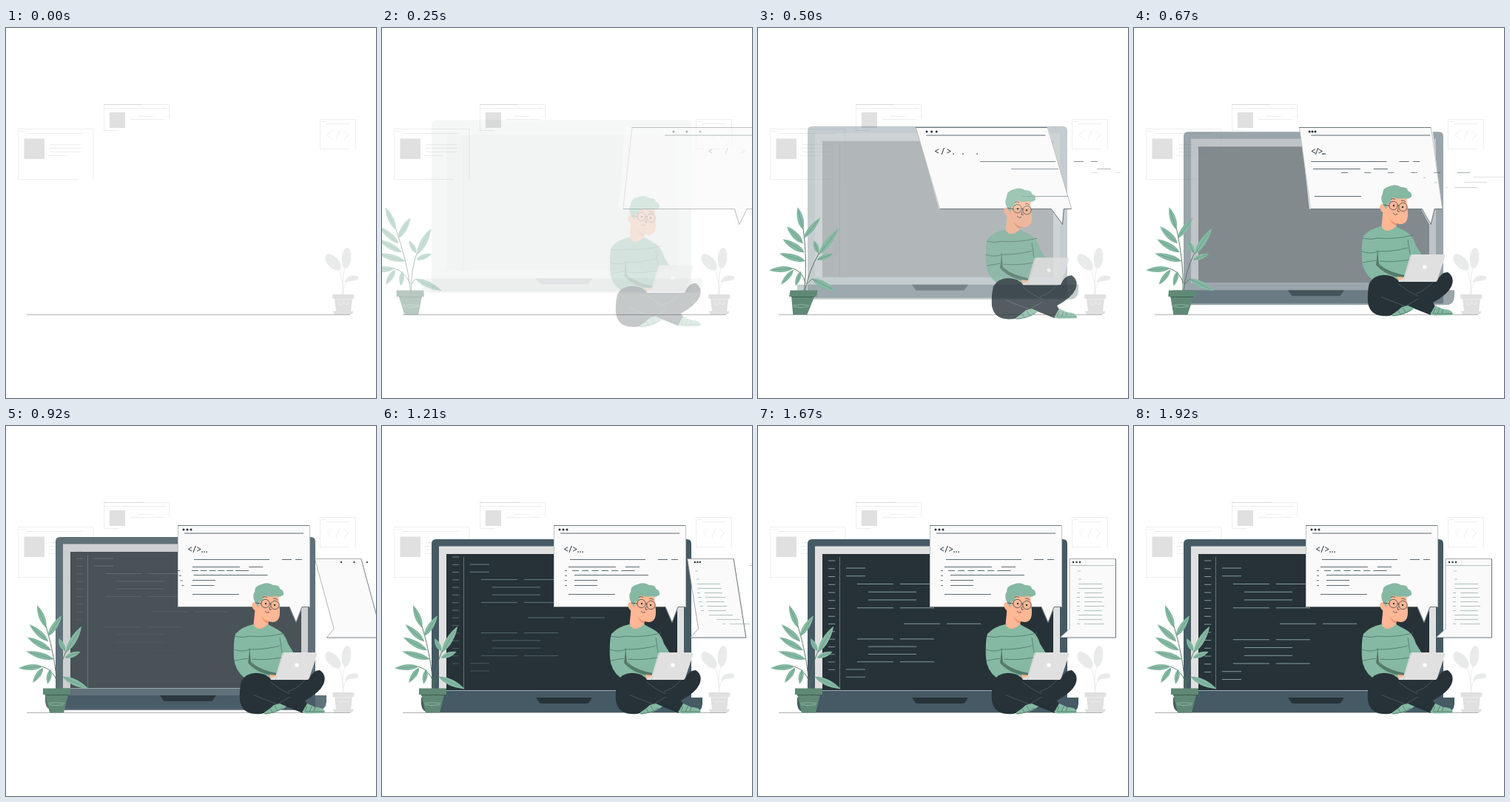
Recreate the animation shown at these times as an HTML page. Size 500x500 px, loop 2000 ms.

```html
<!DOCTYPE html>
<html lang="en">
<head>
<meta charset="utf-8">
<title>Programming</title>
<style>
html, body { margin: 0; width: 100%; height: 100%; overflow: hidden; background: #fff; }
svg { display: block; width: 100vw; height: 100vh; }
text { font: 500 12px "Noto Sans Mono", "DejaVu Sans Mono", monospace; text-anchor: middle; fill: #263238; }
.line { fill: none; stroke: #e9e9e9; stroke-width: .8; }
.ink { fill: none; stroke: #37474f; stroke-width: .8; }
.gray { fill: #e0e0e0; }
.green { fill: #85b9a3; }
.dark { fill: #263238; }
.slate { fill: #455a64; }
.skin { fill: #ffb794; }
.fold { fill: none; stroke: #4d7565; stroke-width: .8; }
</style>
</head>
<body>
<svg viewBox="0 0 500 500">
  <g id="backdrop">
    <path class="line" d="M16.500 205V136.500H118V205M16 204.500H97M27 142.500H104M18 139.500H26"/>
    <path class="line" d="M60 157.500H101M58 162.500H101M60 167.500H101M57 172.500H83"/>
    <path class="gray" d="M24.500 149.500h27.500v27.500h-27.500zM140 114h21v21h-21z"/>
    <path class="line" d="M132.500 139V103.500H220.500V123M132 108.500H217M132 138.500H152M179 119.500H199M168 123.500H214"/>
    <path d="M132 103.500H185" stroke="#d5d5d5" stroke-width=".8"/>
    <path class="line" d="M424.500 164V123.500H473M472.500 124V164M424 163.500H464M433 129.500H464M427 126.500H432"/>
    <path class="line" d="M440 139L434 144.500L440 150M451 138L446 151M457 139L463 144.500L457 150"/>
    <g fill="#e8ebea">
      <ellipse cx="442" cy="316.500" rx="7.500" ry="13.500" transform="rotate(-43 442 316.500)"/>
      <ellipse cx="460" cy="311" rx="6.200" ry="14" transform="rotate(6 460 311)"/>
      <path d="M458 345C459 336 465 333 475 335C479 341 470 342 465 342C463 342 461 343 458 345Z"/>
    </g>
    <path class="line" d="M450 326Q456 340 455.500 360M458 323Q454 340 455.500 360M460 344Q456 348 455.500 360"/>
    <path class="gray" d="M441.500 360H470V366H441.500ZM444 366H468L466 383H446ZM442 382.500H469.500Q469 387.500 465 387.500H446Q442 387 442 382.500Z"/>
    <path d="M444 367H468M448 371l4 3 4-3 4 3 4-3" fill="none" stroke="#efefef"/>
  </g>
  <path d="M28 387.500H465" stroke="#aaa" stroke-width=".9"/>

  <g id="laptop">
    <path class="slate" d="M67 385V159Q67 153 73 153H412Q418 153 418 159V385Z"/>
    <path class="slate" d="M53 367H433V376Q432 387 422 387H64Q54 387 53 376Z"/>
    <path class="gray" d="M77 357V162.500H408V357Z"/>
    <path id="screen" class="dark" d="M87 357V173H399V357Z"/>
    <path d="M77 357.500H408" stroke="#b9c4c8" stroke-width=".8"/>
    <path class="dark" d="M208 367H284L280 373Q279 375 276 375H216Q213 375 212 373Z"/>
    <path d="M110.500 177V356" stroke="#819095" stroke-width=".7"/>
  </g>
  <g id="code" stroke="#91a9a4" stroke-width=".9"></g>

  <g id="panel">
    <path d="M421 179.500H483.500V286H408L421 274Z" fill="#fafafa"/>
    <path d="M408 286L421 274V179.500H483.500" fill="none" stroke="#888" stroke-width=".7"/>
    <path d="M483.500 179.500V286H408" fill="none" stroke="#45525a" stroke-width=".8"/>
  </g>
  <g id="panelText"></g>

  <path id="bubbleFill" d="M232 134H410.500V244.500H400L392 265.500L383 244.500H232Z" fill="#fafafa"/>
  <g id="bubble" fill="none" stroke-width=".8">
    <path d="M232.500 134.500H410.500V244.500H400L392 265.500L383 244.500H232.500Z" fill="#fafafa" stroke="#b2b6b8"/>
    <path d="M232 134.500H410M232.500 244.500H383L392 265.500L400 244.500H410" stroke="#5d686d"/>
  </g>
  <g id="bubbleText"></g>

  <g id="plant">
    <path d="M69 355Q68 318 54 270M70 355Q71 328 81 304M69 345Q63 329 49 325M71 346L77 339" fill="none" stroke="#54705f" stroke-width=".9"/>
    <g id="leaves"></g>
    <path d="M50 354.500H87V363H50ZM53 363H84L78 387.500H59Z" fill="#5f8975"/>
    <path d="M53 363.500H84" stroke="#3f6150" stroke-width="1.200"/>
    <path d="M57 375Q68 372 79 375M58 376.500Q68 379 78 376.500" fill="none" stroke="#9ac4b0" stroke-width=".7"/>
  </g>

  <g id="person">
    <path class="skin" d="M337 242L334 274Q345 284 355 274L354 260Z"/>
    <path class="skin" d="M339 224Q353 217 368 228L370 249Q371 265 360 265Q348 264 341 252Q333 249 332 242Q333 236 339 239Z"/>
    <path d="M345 257Q349 263 355 264L354 267Q347 264 345 257Z" fill="#e99573"/>
    <path class="green" d="M337 239Q332 231 336 224Q336 216 345 214Q354 210 361 215Q370 215 370 220Q376 222 375 228Q371 232 365 230Q356 232 350 229Q347 230 347 236L342 238L341 245Z"/>
    <g class="ink">
      <circle cx="350.500" cy="240" r="5.700"/><circle cx="363.500" cy="242" r="5.700"/>
      <path d="M337 239L345 240M356 240Q357.500 239 358 241M347 231.500Q350 229.500 353 231.500M361 233.500Q364 232 367 235M357 244L356 248L359 248M350 250Q352 253.500 356 251.500"/>
    </g>
    <circle class="dark" cx="351" cy="240" r="1.200"/><circle class="dark" cx="363" cy="242" r="1.200"/>
    <path class="green" d="M310 281Q319 271 334 268Q341 280 354 268L367 275Q377 280 381 294L389 307L384 322L366 342L322 340Q309 330 308 313Q307 291 310 281Z"/>
    <path d="M329 303L331 320Q345 330 366 334L364 338Q340 335 327 320Z" fill="#577c6c"/>
    <path class="fold" d="M308 302Q319 306 330 302Q352 302 370 297M309 284Q320 287 329 284Q352 286 377 280M309 317L327 314M332 315Q350 317 372 313M329 300L330 318Q346 334 366 335M370 286L373 306"/>
    <path class="dark" d="M318 345Q328 329 350 336L360 343H409Q414 330 424 330Q434 337 429 349Q424 360 404 371L407 376L401 388L371 376L357 385Q348 390 336 389Q319 388 316 371Q315 357 318 345Z"/>
    <path d="M334 363Q352 371 367 376L384 366M381 359Q394 355 404 343M358 346Q370 357 384 362" fill="none" stroke="#57636a" stroke-width=".7"/>
    <path class="green" d="M370 375L379 379Q370 386 359 388Q348 391 349 387Q357 382 362 377ZM407 375L418 380Q431 380 431 388L406 388.500L400 387Z"/>
    <path class="fold" d="M357 382l4 6M363 378l4 6M349 389Q363 388 374 381M407 379l-3 7M413 379l-3 7M405 386H430M418 380l-2 5"/>
    <path class="skin" d="M356 336L367 337L364 342L357 341Z"/>
    <path d="M376 306H418Q421 306 420 310L410 340Q409 343 405 343H358L357 341L364 339L373 309Q374 306 376 306Z" fill="#e0e0e0"/>
    <path d="M364 343L375 307" stroke="#c8c8c8" stroke-width=".7"/>
    <circle cx="393" cy="323" r="2.700" fill="#fff"/>
  </g>
</svg>

<script>
const $ = id => document.getElementById(id);
const LOOP = 2000;

const ramp = (t, from, to) => Math.min(1, Math.max(0, (t - from) / (to - from)));
const smooth = (t, from, to) => {
  const p = ramp(t, from, to);
  return p * p * (3 - 2 * p);
};

// Linear track through [time, value] points
function track(t, points) {
  const i = points.findIndex(([time]) => t <= time);
  if (i === 0) return points[0][1];
  if (i < 0) return points[points.length - 1][1];
  const [t0, a] = points[i - 1], [t1, b] = points[i];
  return a + (b - a) * ramp(t, t0, t1);
}

function add(parent, tag, attrs, text = '') {
  const el = document.createElementNS('http://www.w3.org/2000/svg', tag);
  for (const name in attrs) el.setAttribute(name, attrs[name]);
  el.textContent = text;
  return $(parent).appendChild(el);
}

function place(el, dx, dy, opacity) {
  el.setAttribute('transform', `translate(${dx} ${dy})`);
  el.setAttribute('opacity', opacity);
}

// Rush in sideways, leaning forward, then back, then upright
const LEAN = [[130, -30], [370, 17], [430, 20], [670, 8], [790, -4], [900, 0]];
function lightSpeed(id, t, distance, cy, tilt = 1) {
  const x = distance * (1 - ramp(t, 130, 400)) ;
  const angle = tilt * track(t, LEAN);
  $(id).setAttribute('transform', `translate(${x} ${cy}) skewX(${angle}) translate(0 ${-cy})`);
  $(id).setAttribute('opacity', ramp(t, 130, 400));
}

// Small parts fly in from the right, each after its own delay
const FLIGHT = [[0, 300], [300, 0], [420, -15], [600, 0]];
const flyers = [];
const fly = (delay, el) => flyers.push({ delay, el });

function stroke(parent, delay, x, y, width, color = '#37474f') {
  fly(delay, add(parent, 'path', { d: `M${x} ${y}h${width}`, stroke: color, 'stroke-width': .8 }));
}

function dots(parent, delay, x, y, gap, r) {
  for (let i = 0; i < 3; i++) {
    fly(delay + i * 13, add(parent, 'circle', { class: 'dark', cx: x + i * gap, cy: y, r }));
  }
}

function buildBubble() {
  const line = (...args) => stroke('bubbleText', ...args);
  dots('bubbleText', 105, 240, 140, 5, 1.5);
  [...'</>...'].forEach((char, i) => {
    const x = i < 3 ? 248.5 + i * 6.2 : 256 + i * 3;
    fly(146 + i * 16, add('bubbleText', 'text', { x, y: 171 }, char));
  });
  line(92, 241, 145, 161);
  line(247, 254, 180.5, 102);
  line(255, 373, 180.5, 13);
  line(260, 391, 180.5, 9);
  line(291, 252, 190.5, 64);
  line(330, 329, 190.5, 19);
  line(305, 252, 227.5, 63);
  for (let i = 0; i < 6; i++) line(394 + i * 18, 257 + i * 13.3, 195.5, i < 5 ? 9 : 18);
  for (let i = 0; i < 4; i++) line(500 + i * 15, 247, 195.5 + i * 6.7, 3);
  for (let i = 0; i < 3; i++) line(570 - i * 13, 260, 201.5 + i * 7, i ? 31 : 100);
}

function buildPanel() {
  const line = (...args) => stroke('panelText', ...args, '#9eb3ac');
  dots('panelText', 648, 426, 184, 4.5, 1.2);
  line(985, 422, 188.5, 59);
  line(840, 432, 196, 4);
  line(845, 433, 207, 4);
  for (let i = 0; i < 10; i++) {
    const y = 213.5 + i * 6, delay = 850 + i * 10;
    if (i % 7 < 2) {
      line(delay, 433, y, 32);
    } else {
      line(delay, 431, y, 4);
      line(delay, 441, y, 24 + i % 2 * 3);
    }
  }
}

// Indented blocks mirrored around the middle row; ticks number the rows
const codeLines = [];
function buildCode() {
  const line = (delay, x, y, width) =>
    codeLines.push({ delay, el: add('code', 'path', { d: `M${x} ${y}h${width}` }) });
  for (let i = 0; i < 15; i++) {
    const m = Math.abs(i - 7), y = 192 + i * 10.75;
    const depth = m > 5 ? 0 : m === 3 || m === 4 ? 2 : 1;
    const x = m ? 119 + depth * 15 : 197;
    const width = depth ? 33 + depth * 16 : 26;
    line(i * 26, 95, y - 10, 9);
    if (m === 1) continue;
    line(i * 26, x, y, width);
    if (m === 0 || m === 2 || m === 5) line(i * 26, x + width + 9, y, 46);
  }
}

function leaf(x, y, angle, length) {
  const l = length, w = 3 + length * .07;
  const transform = `translate(${x} ${y}) rotate(${angle})`;
  add('leaves', 'path', {
    class: 'green', transform,
    d: `M0 0C${l * .2} ${w} ${l * .65} ${w} ${l} 0C${l * .65} ${-w} ${l * .2} ${-w} 0 0Z`
  });
  add('leaves', 'path', { transform, d: `M0 0H${l * .85}`, stroke: '#66917e', 'stroke-width': .6 });
}

function buildPlant() {
  leaf(54, 272, -112, 32);
  leaf(57, 284, -57, 33);
  for (let i = 0; i < 3; i++) leaf(57 + i * 3.5, 291 + i * 12, -138 - i * 13, 34 + i * 2);
  leaf(49, 325, 176, 32);
  for (let i = 0; i < 2; i++) leaf(50 + i * 10, 327 + i * 2, 125 - i * 24, 24 - i * 4);
  leaf(81, 306, -59, 41);
  leaf(80, 304, -118, 19);
  leaf(80, 313, -21, 22);
  leaf(77, 339, 25, 38);
}

// Laptop parts fade one by one, so lower parts show through
function drawLaptop(t) {
  const drop = -30 * (1 - smooth(t, 130, 1110));
  const fade = smooth(t, 100, 1180);
  for (const part of $('laptop').children) place(part, 0, drop, fade);
  $('screen').setAttribute('opacity', fade ** 1.5);
  for (const { delay, el } of codeLines) {
    const own = -15 * (1 - ramp(t - delay, 650, 1490));
    place(el, 0, drop + own, ramp(t - delay, 560, 1400));
  }
}

function draw(t) {
  drawLaptop(t);
  const rise = ramp(t, 130, 600);
  place($('person'), 0, 20 * (1 - rise), rise);
  lightSpeed('plant', t, -60, 314, -.55);
  lightSpeed('bubbleFill', t + 15 * ramp(t, 130, 300), 178, 199.5);
  lightSpeed('bubble', t, 178, 199.5);
  lightSpeed('panel', t - 560, 75, 232.5);
  for (const { delay, el } of flyers) {
    const dx = track(t - delay, FLIGHT);
    place(el, dx, 0, t < 130 ? 0 : 1 - ramp(dx, 0, 250));
  }
}

buildBubble();
buildPanel();
buildCode();
buildPlant();

function tick(now) {
  draw(now % LOOP);
  requestAnimationFrame(tick);
}
draw(0);
requestAnimationFrame(tick);
</script>
</body>
</html>
```
